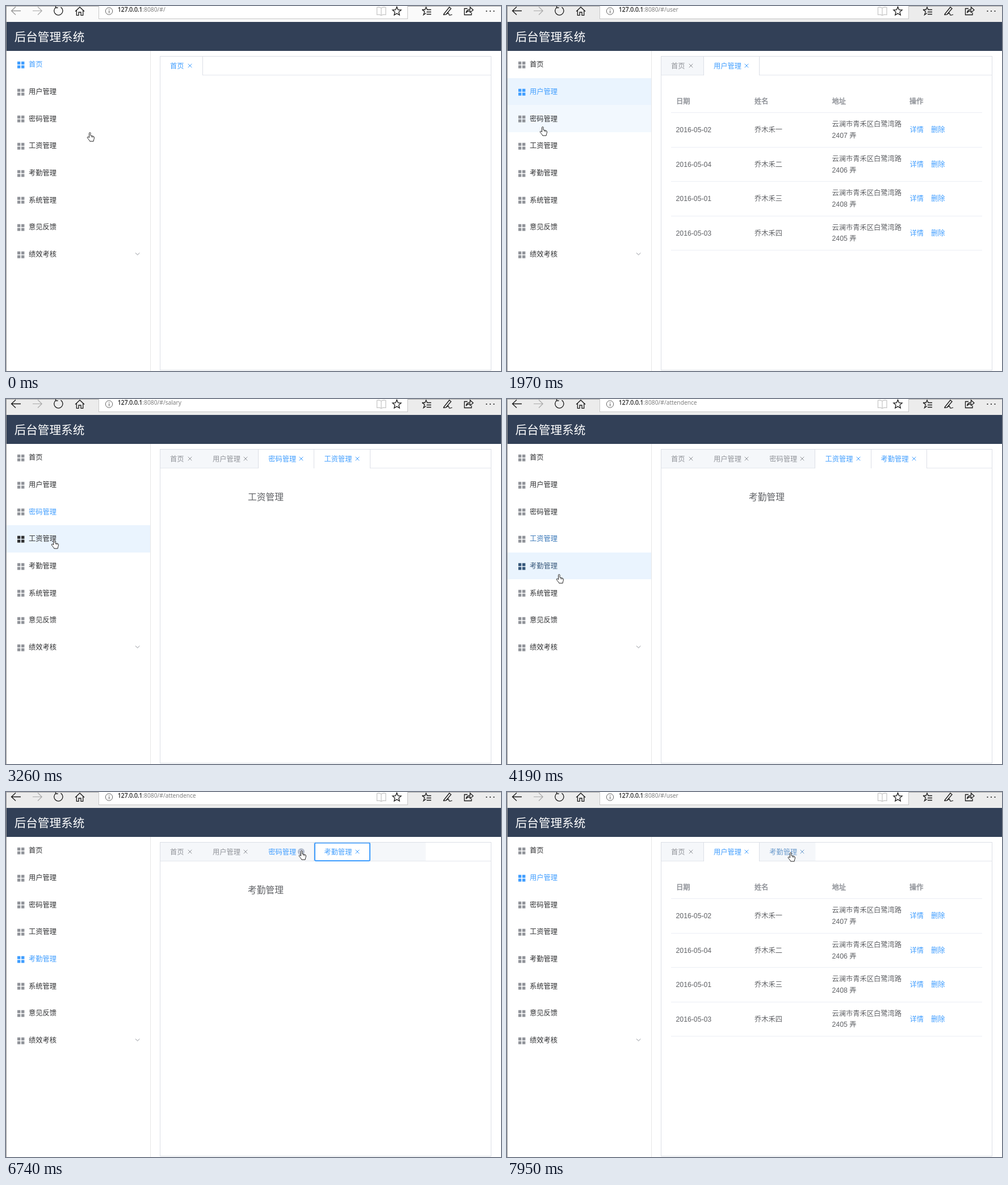
Animation of 872 by 642 pixels, one loop 8 s. Source, as an HTML page:

```html
<!DOCTYPE html>
<html lang="zh-CN">
<head>
<meta charset="utf-8">
<title>后台管理系统</title>
<style>
html, body { margin: 0; width: 100%; height: 100%; overflow: hidden; background: #fff; }
svg { display: block; }
text { font: 12.25px "Liberation Sans", "Noto Sans CJK SC", "Noto Sans CJK", sans-serif; white-space: pre; }
.url { font: 10.25px "Open Sans", sans-serif; }
.host { stroke: #222; stroke-width: .3; }
.head { stroke: #909399; stroke-width: .5; }
.ico { fill: none; stroke: #1a1a1a; stroke-width: 1.3; }
</style>
</head>
<body>
<svg id="stage" width="872" height="642" viewBox="0 0 872 642"></svg>
<script>
const LOOP = 8000;
const BLUE = [64, 158, 255], DARK = [48, 49, 51], GRAY = [144, 147, 153];
const WHITE = [255, 255, 255], PALE = [245, 247, 250];
const HOME = 0, USER = 1, PASS = 2, PAY = 3, ATT = 4;
const MENU = ['首页', '用户管理', '密码管理', '工资管理', '考勤管理', '系统管理', '意见反馈', '绩效考核'];
const PATHS = ['', 'user', 'password', 'salary', 'attendence'];
const PEOPLE = [
  ['2016-05-02', '乔木禾一', '2407 弄'],
  ['2016-05-04', '乔木禾二', '2406 弄'],
  ['2016-05-01', '乔木禾三', '2408 弄'],
  ['2016-05-03', '乔木禾四', '2405 弄']
];
const ROAD = '云澜市青禾区白鹭湾路';

// Each step overrides the state before it.
// at: pointer tip, rows: menu hover, m / q: menu and tab fade after a page change,
// hov: hovered tab and strength, shut: tab whose close button is hovered, ring: focus outline
const STEPS = [
  [0, { at: [148, 222], cur: HOME, from: -1, m: 1, q: 1, rows: {}, tabs: [HOME], hov: [-1, 0], shut: -1, ring: 0, nav: 0, bar: '#fafafa' }],
  [120, { at: [134, 207], rows: { 2: .6 } }],
  [250, { at: [117, 193], rows: { 2: 1 } }],
  [390, { at: [101, 181] }],
  [520, { at: [86, 172], rows: { 2: 1, 1: .5 } }],
  [650, { at: [74, 166], rows: { 1: 1 } }],
  [790, { at: [66, 163] }],
  [920, { at: [63, 161] }],
  [1050, { cur: USER, from: HOME, m: 0, q: 0, tabs: [HOME, USER], bar: '#ececec' }],
  [1200, { m: .6, q: .5 }],
  [1320, { m: 1, q: 1 }],
  [1850, { at: [63, 187] }],
  [1970, { at: [63, 212], rows: { 1: 1, 2: .6 } }],
  [2360, { cur: PASS, from: USER, m: 0, q: 0, rows: { 2: 1 }, tabs: [HOME, USER, PASS] }],
  [2480, { m: .6, q: .5 }],
  [2600, { m: 1, q: 1 }],
  [2870, { at: [75, 230] }],
  [2990, { at: [85, 247], rows: { 2: 1, 3: .6 } }],
  [3260, { cur: PAY, from: PASS, m: 0, q: 0, rows: { 3: 1 }, tabs: [HOME, USER, PASS, PAY] }],
  [3380, { m: .5, q: .4 }],
  [3520, { m: 1, q: 1 }],
  [3650, { at: [89, 280] }],
  [3800, { at: [92, 308], rows: { 3: 1, 4: .6 } }],
  [4190, { cur: ATT, from: PAY, m: .35, q: 0, rows: { 4: 1 }, tabs: [HOME, USER, PASS, PAY, ATT] }],
  [4340, { m: .9, q: .7 }],
  [4470, { m: 1, q: 1 }],
  [4600, { at: [150, 285], rows: { 4: 1 } }],
  [4730, { at: [290, 225], rows: {} }],
  [4870, { at: [440, 165] }],
  [5010, { at: [550, 128] }],
  [5150, { at: [600, 112], hov: [PAY, 1] }],
  [5300, { at: [612, 109] }],
  [5430, { at: [618, 107], shut: PAY }],
  [5570, { at: [620, 107] }],
  [5720, { tabs: [HOME, USER, PASS, ATT], from: -1, hov: [-1, 0], shut: ATT, ring: .35, nav: 739.5 }],
  [5840, { ring: .8 }],
  [5970, { ring: 1 }],
  [6100, { at: [614, 109] }],
  [6230, { at: [597, 112], shut: -1 }],
  [6350, { at: [574, 113] }],
  [6480, { at: [548, 110] }],
  [6610, { at: [530, 106], hov: [PASS, .6] }],
  [6740, { at: [521, 103], hov: [PASS, 1], shut: PASS }],
  [6870, { tabs: [HOME, USER, ATT], hov: [-1, 0], shut: ATT }],
  [7010, { at: [495, 113], shut: -1 }],
  [7150, { at: [448, 119] }],
  [7290, { at: [402, 110], hov: [USER, 1] }],
  [7560, { cur: USER, from: ATT, m: 0, q: 0, ring: 0, nav: 0 }],
  [7690, { m: .6, q: .5 }],
  [7820, { m: 1, q: 1, at: [450, 109], hov: [-1, 0] }],
  [7950, { at: [500, 106], hov: [ATT, .5] }]
];

const mix = (a, b, k) => `rgb(${a.map((v, i) => Math.round(v + (b[i] - v) * k))})`;
const rect = (x, y, w, h, fill, more = '') => `<rect x="${x}" y="${y}" width="${w}" height="${h}" fill="${fill}" ${more}/>`;
const text = (x, y, s, fill, more = '') => `<text x="${x}" y="${y}" fill="${fill}" ${more}>${s}</text>`;
const line = (d, more = 'class="ico"') => `<path d="${d}" ${more}/>`;
const cross = (x, y, r, color) =>
  line(`M${x - r} ${y - r}l${2 * r} ${2 * r}m0 ${-2 * r}l${-2 * r} ${2 * r}`, `stroke="${color}" fill="none"`);

function star(x, y, r) {
  const pts = Array.from({ length: 10 }, (_, i) => {
    const a = i * Math.PI / 5, d = i % 2 ? r * .45 : r;
    return `${x + d * Math.sin(a)} ${y - d * Math.cos(a)}`;
  });
  return line(`M${pts.join('L')}Z`);
}

function toolbar(s) {
  const back = s.bar === '#fafafa' ? '#999' : '#1a1a1a';
  const faint = color => `fill="none" stroke="${color}" stroke-width="1.2"`;
  return rect(0, 0, 872, 28, s.bar) + rect(0, 0, 872, 1, '#aaa')
    + rect(163.5, -2, 544, 24.5, '#fff', 'stroke="#c8c8c8"')
    + line('M26 8.5H9.5M17 1.5L9.5 8.5L17 15.5', `fill="none" stroke="${back}" stroke-width="1.3"`)
    + line('M47 8.5H63M56 1.5L63.2 8.5L56 15.5', faint('#aaa'))
    + line('M88 2.2A7.6 7.6 0 1 0 96.5 2.1M87.5 -1V3H91.5')
    + line('M122 9.5L130 2L138 9.5M124.3 8V16.4H128V11H132V16.4H135.7V8')
    + '<circle cx="181.5" cy="9" r="6.2" fill="none" stroke="#666"/>'
    + rect(181, 8, 1.2, 4.5, '#666') + rect(181, 5.5, 1.2, 1.3, '#666')
    + text(197, 10.4, `<tspan class="host">127.0.0.1</tspan><tspan fill="#777">:8080/#/${PATHS[s.cur]}</tspan>`, '#222', 'class="url"')
    + line('M661 3.5Q657 1.5 653.5 2.5V15.5Q657 14.5 661 16.5Q665 14.5 669 15.5V2.5Q665 1.5 661 3.5V16', faint('#c4c4c4'))
    + star(688.5, 9.5, 8)
    + line('M733 6.5H738L740 2L742 6.5H749M733 6.5L737.5 10L735.5 15.5L740 12.5M741 10.5H749M741 14.5H749')
    + line('M771 14.5L781 2L784 4.5L775 15L771 15.5ZM775 15Q780 10.5 780 14T786 15')
    + line('M813 4.5H807.5V15.5H820V11.5M810.5 12Q811.5 6 817.5 6V2L823 7L817.5 11.5V8.5Q813 8.5 810.5 12Z')
    + [846.5, 853, 859.5].map(x => `<circle cx="${x}" cy="9" r="1.1" fill="#1a1a1a"/>`).join('');
}

function sidebar(s) {
  let out = rect(254, 79, 1, 563, '#e6e6e6');
  MENU.forEach((name, i) => {
    const top = Math.round(79 + 47.65 * i), next = Math.round(79 + 47.65 * (i + 1));
    const mid = 103 + 47.65 * i, iy = Math.round(mid - 5) - .3;
    if (s.rows[i]) out += rect(1, top, 253, next - top, '#eaf4fe', `opacity="${s.rows[i]}"`);
    const now = mix(DARK, BLUE, s.m);
    const ink = i === s.cur ? now : i === s.from ? mix(BLUE, DARK, s.m) : mix(DARK, DARK, 0);
    const icon = i === s.cur ? now : '#909399';
    for (const dx of [0, 7]) for (const dy of [0, 6.7]) out += rect(20 + dx, iy + dy, 5.4, 5.2, icon);
    out += text(40, mid + 4.4, name, ink);
  });
  return out + line('M228 434.2L231.7 437.8L235.4 434.2', 'fill="none" stroke="#909399"');
}

function tabBar(s) {
  const left = i => i ? 347 + 98.2 * (i - 1) : 272;
  const end = s.tabs.length;
  let out = rect(272, 89, Math.max(s.nav, left(end)) - 272, 32, mix(PALE, PALE, 0));
  let edges = rect(272, 121, 583, 1, '#e4e7ed');
  s.tabs.forEach((id, i) => {
    const x = Math.round(left(i)), w = Math.round(left(i + 1)) - x, active = id === s.cur;
    let ink = mix(GRAY, BLUE, id === s.hov[0] ? s.hov[1] : 0);
    if (active) ink = mix(BLUE, BLUE, 0);
    else if (id === s.from && s.q < 1) ink = mix(BLUE, GRAY, s.q);
    const lit = active ? 1 : id === s.from ? 1 - s.q : 0;
    if (lit) {
      out += rect(x, 89, w, 33, mix(PALE, WHITE, lit));
      const sides = (i ? rect(x - 1, 89, 1, 33, '#dcdfe6') : '') + rect(x + w - 1, 89, 1, 33, '#dcdfe6');
      edges += `<g opacity="${lit}">${rect(x, 121, w, 1, '#fff')}${sides}</g>`;
    }
    if (active && s.ring)
      edges += rect(x + 1, 89.5, w - 2, 31.5, 'none', `rx="2" stroke="#409eff" stroke-width="2" opacity="${s.ring}"`);
    const tx = left(i) + 17, cx = Math.round(left(i + 1)) - 23;
    edges += text(tx, 109.5, MENU[id], ink);
    if (id === s.shut)
      edges += `<circle cx="${cx}" cy="105" r="6" fill="#b4bccc"/>` + cross(cx, 105, 2.6, '#fff');
    else edges += cross(cx, 105, 3.3, ink);
  });
  return out + edges;
}

function table() {
  const ink = '#606266';
  let out = ['日期', '姓名', '地址', '操作']
    .map((h, i) => text([298, 436, 572.5, 709][i], 171.5, h, '#909399', 'class="head"')).join('');
  for (let i = 0; i < 5; i++) out += rect(289, Math.round(187 + 60.5 * i), 548, 1, '#ebeef5');
  PEOPLE.forEach(([day, name, lane], i) => {
    const y = 222.4 + 60.4 * i;
    out += text(297.5, y, day, ink) + text(436, y, name, ink)
      + text(572.5, y - 10, ROAD, ink) + text(572.5, y + 9.8, lane, ink)
      + text(709.5, y, '详情', '#409eff') + text(747, y, '删除', '#409eff');
  });
  return out;
}

function content(s) {
  if (s.cur === HOME) return '';
  if (s.cur === USER) return table();
  return text(426, 178.3, MENU[s.cur], '#606266', 'style="font-size:15.75px"');
}

const hand = ([x, y]) => `<g transform="translate(${x} ${y})" stroke="#222" stroke-linejoin="round">`
  + line('M-1.5 9.5V1.6C-1.5 .1 1 .1 1 1.6V6L5.8 7.2C7.2 7.6 7.7 8.4 7.5 9.8C7.3 12 6.4 13.2 6.1 16H-.2'
    + 'C-1 14-3.4 11.8-4.6 9.8C-5.3 8.4-3.8 7.6-2.8 8.5Z', 'fill="#fff"')
  + line('M3.2 6.8V9.4M5.4 7.4V9.6', 'fill="none" stroke-width=".8"') + '</g>';

const stage = document.getElementById('stage');
let shown = -1;

function draw(now) {
  const t = now % LOOP;
  const n = STEPS.filter(([at]) => at <= t).length;
  if (n !== shown) {
    shown = n;
    const s = Object.assign({}, ...STEPS.slice(0, n).map(step => step[1]));
    stage.innerHTML = rect(0, 0, 872, 642, '#fff') + toolbar(s)
      + rect(0, 28, 872, 51, '#324057')
      + text(14.7, 61.8, '后台管理系统', '#fff', 'style="font-size:20.6px"')
      + sidebar(s) + tabBar(s)
      + rect(271.5, 88.5, 583, 552, 'none', 'stroke="#dcdfe6"')
      + content(s) + rect(0, 0, 1, 642, '#999') + hand(s.at);
  }
}

const start = performance.now();
function tick() {
  draw(performance.now() - start);
  requestAnimationFrame(tick);
}
tick();
</script>
</body>
</html>
```
